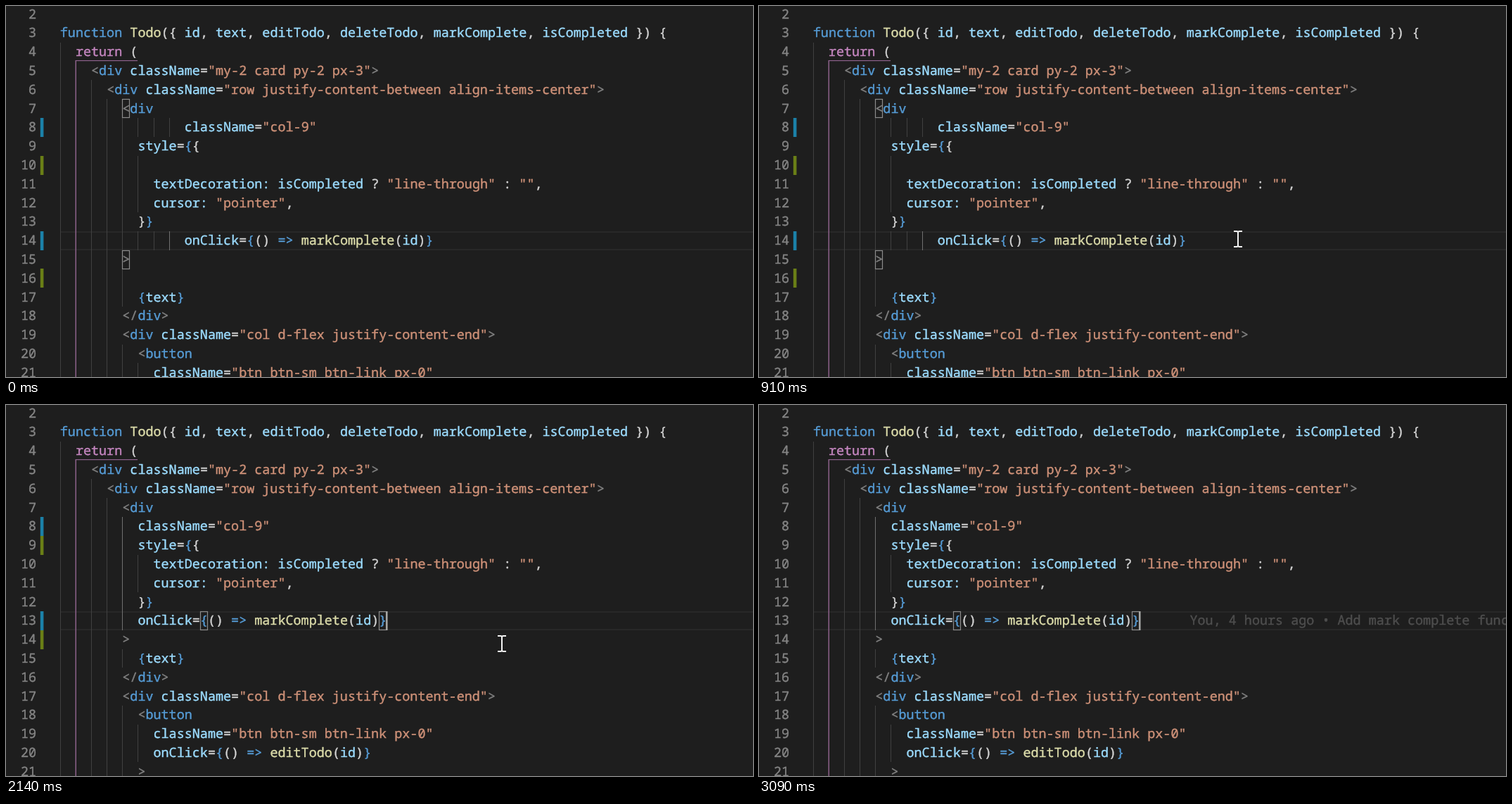
Write an HTML page that moves like this. It is 1062x527 px and loops after 3270 ms.

```html
<!DOCTYPE html>
<html lang="en">
<head>
<meta charset="utf-8">
<title>Code formatting on save</title>
<style>
  html, body { margin: 0; width: 100%; height: 100%; overflow: hidden; background: #1e1e1e; }
  svg { display: block; }
  text {
    font: 18.43px "Noto Sans Mono", "DejaVu Sans Mono", monospace;
    text-rendering: geometricPrecision;
    white-space: pre;
    stroke-width: .4px;
  }
</style>
</head>
<body>
<svg id="stage" width="1062" height="527" viewBox="0 0 1062 527"></svg>
<script>
const LOOP = 3270;
const LEFT = 76.8, CHAR = 11.06, LINE = 26.8, FIRST = 2;
const COLOR = {
  plain: '#d4d4d4', keyword: '#569cd6', control: '#c586c0', func: '#dcdcaa',
  name: '#9cdcfe', string: '#ce9178', angle: '#808080',
  number: '#858585', guide: '#404040', activeGuide: '#707070',
  scope: '#8b618a', changed: '#1b81a8', added: '#6a7f16', blame: '#4e4e4e'
};

const head = [
  '',
  'function Todo({ id, text, editTodo, deleteTodo, markComplete, isCompleted }) {',
  '  return (',
  '    <div className="my-2 card py-2 px-3">',
  '      <div className="row justify-content-between align-items-center">',
  '        <div'
];
const style = [
  '            textDecoration: isCompleted ? "line-through" : "",',
  '            cursor: "pointer",',
  '          }}'
];
const tail = [
  '          {text}',
  '        </div>',
  '        <div className="col d-flex justify-content-end">',
  '          <button',
  '            className="btn btn-sm btn-link px-0"',
  '            onClick={() => editTodo(id)}',
  '          >'
];
const click = 'onClick={() => markComplete(id)}';
const messy = [
  ...head, ' '.repeat(16) + 'className="col-9"', '          style={{', '',
  ...style, ' '.repeat(16) + click, '        >', '', ...tail.slice(0, 5)
];
const tidy = [
  ...head, '          className="col-9"', '          style={{',
  ...style, '          ' + click, '        >', ...tail
];

const stage = document.getElementById('stage');
const colX = c => LEFT + c * CHAR;
const lineY = n => 11.5 + (n - FIRST) * LINE;
const topY = n => Math.round(lineY(n) - LINE / 2);

function add(parent, tag, attrs = {}, content) {
  const el = document.createElementNS('http://www.w3.org/2000/svg', tag);
  for (const key in attrs) el.setAttribute(key, attrs[key]);
  if (content) el.textContent = content;
  parent.appendChild(el);
  return el;
}
const group = parent => add(parent, 'g');
const rect = (parent, x, y, width, height, fill) =>
  add(parent, 'rect', { x, y, width, height, fill });
// A hairline stroke gives the glyphs a little more weight.
const write = (parent, x, n, color, content, anchor = 'start') =>
  add(parent, 'text', {
    x, y: Math.round(lineY(n) + 6), fill: color, stroke: color, 'text-anchor': anchor
  }, content);

function tokenColor(token, index, line) {
  if (token[0] === '"') return COLOR.string;
  if (/^<\/?$|^>$/.test(token)) return COLOR.angle;
  if (/^(=>|function|div|button)$/.test(token)) return COLOR.keyword;
  if (token === 'return') return COLOR.control;
  if (token === 'Todo') return COLOR.func;
  if (/^\w/.test(token)) return line[index + token.length] === '(' ? COLOR.func : COLOR.name;
  const jsxBrace = !line.startsWith('function') && '{}'.includes(token) &&
    (index === line.indexOf('{') || index === line.lastIndexOf('}'));
  return jsxBrace ? COLOR.keyword : COLOR.plain;
}

const indent = line => line.search(/\S/);

// Blank lines take one level more than the shallower neighbour.
function guideDepth(lines, i) {
  if (lines[i]) return indent(lines[i]);
  if (!i) return 0;
  return Math.min(indent(lines[i - 1]), indent(lines[i + 1])) + 2;
}

function drawCode(lines, current, active) {
  const g = group(stage);
  const top = topY(current);
  rect(g, 78, top, 984, 2, '#282828');
  rect(g, 78, top + 25, 984, 2, '#282828');
  lines.forEach((line, i) => {
    const n = i + FIRST;
    write(g, 43, n, COLOR.number, n, 'end');
    const depth = guideDepth(lines, i);
    for (let c = 0; c < depth; c += 2) {
      if (c === 2) continue;
      const lit = c === active.col && n >= active.from && n <= active.to;
      rect(g, Math.round(colX(c)), topY(n), 1, topY(n + 1) - topY(n),
        lit ? COLOR.activeGuide : COLOR.guide);
    }
    for (const m of line.matchAll(/"[^"]*"|<\/?|=>|\w+(: ?(?=isC|"p))?|[^\s\w]/g)) {
      const token = m[0].trimEnd();
      write(g, colX(m.index), n, tokenColor(token, m.index, line), token);
    }
  });
  rect(g, 99, 77, 88, 1.2, COLOR.scope);
  rect(g, 98.5, 77, 1.5, 450, COLOR.scope);
  return g;
}

function drawMatch(cells) {
  const g = group(stage);
  for (const [col, n] of cells) {
    add(g, 'rect', {
      x: Math.round(colX(col)) + .5, y: topY(n) + .5, width: 10, height: 26,
      fill: 'none', stroke: '#8c8c8c', 'stroke-width': 1.2
    });
  }
  return g;
}

function drawBars(bars) {
  const g = group(stage);
  for (const [n, fill] of bars) rect(g, 48.8, topY(n), 4.6, 27, fill);
  return g;
}

const { changed, added } = COLOR;
const before = drawCode(messy, 14, { col: 14, from: 14, to: 14 });
const after = drawCode(tidy, 13, { col: 8, from: 8, to: 13 });
const oldBars = drawBars([[8, changed], [10, added], [14, changed], [16, added]]);
const newBars = drawBars([[8, changed], [9, added], [13, changed], [14, added]]);
const tagMatch = drawMatch([[8, 7], [8, 15]]);
const braceMatch = drawMatch([[24, 14], [47, 14]]);
const tidyMatch = drawMatch([[18, 13], [41, 13]]);
const oldCaret = rect(stage, 607, 320, 2, 27, '#aeafad');
const newCaret = rect(stage, 540.5, 293, 2, 27, '#aeafad');
const blame = write(stage, 612.5, 13, COLOR.blame,
  'You, 4 hours ago • Add mark complete functionality');
const pointer = add(stage, 'path', {
  d: 'M-6-11H-2Q0-11 0-9Q0-11 2-11H6M0-9V9M-6 11H-2Q0 11 0 9Q0 11 2 11H6',
  fill: 'none', stroke: '#f4f4f4', 'stroke-width': 2
});

// Visible spans in ms.
const spans = [
  [before, 0, 1990], [after, 1990, LOOP],
  [oldBars, 0, 1990], [newBars, 1990, 2310],
  [tagMatch, 0, 1350], [braceMatch, 1350, 1990], [tidyMatch, 1990, LOOP],
  [oldCaret, 1820, 1990], [newCaret, 1990, 2550, 3020, LOOP],
  [blame, 3090, LOOP], [pointer, 70, 2700]
];
// Pointer samples: time, x, y.
const path = [
  [70, 590, 512], [140, 614, 448], [220, 634, 396], [290, 642.5, 379],
  [600, 652, 366], [670, 670, 343], [750, 681, 331],
  [1990, 690, 334], [2060, 700, 337], [2140, 705, 339],
  [2230, 722, 350], [2310, 760, 379], [2380, 810, 418], [2460, 870, 463],
  [2550, 930, 500], [2620, 960, 522]
];

function render(t) {
  for (const [el, ...times] of spans) {
    const on = times.filter(at => at <= t).length % 2;
    el.setAttribute('visibility', on ? 'visible' : 'hidden');
  }
  const [, x, y] = path.filter(p => p[0] <= t).pop() || path[0];
  pointer.setAttribute('transform', `translate(${x} ${y})`);
}

const start = performance.now();
function tick() {
  render((performance.now() - start) % LOOP);
  requestAnimationFrame(tick);
}
tick();
</script>
</body>
</html>
```
